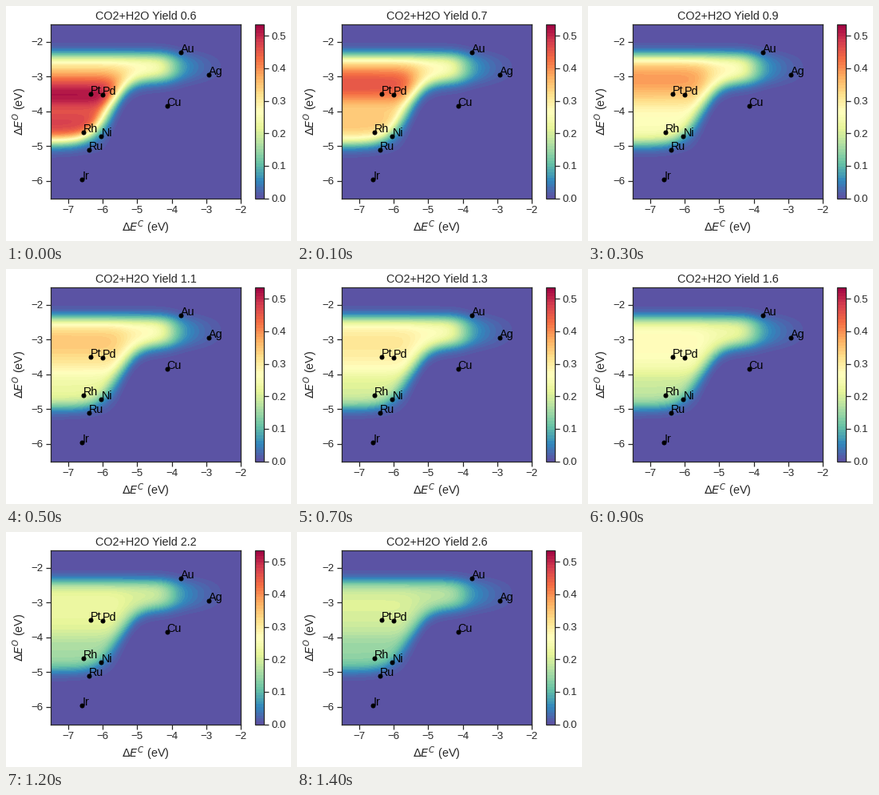
Animation, 357 px wide and 294 px high, one loop 1.5 s. Source, as a matplotlib script:

```python
import numpy as np
import matplotlib.pyplot as plt
from matplotlib.animation import FuncAnimation

W, H, DPI = 357, 294, 72
FRAMES, INTERVAL = 15, 100
INK = "0.15"
MAX_YIELD = 0.534

plt.rcParams.update({
    "font.family": "Liberation Sans",
    "font.size": 14.4,
    "axes.titlesize": 14.4,
    "axes.labelsize": 14.4,
    "axes.linewidth": 1.25,
    "axes.edgecolor": INK,
    "axes.labelcolor": INK,
    "text.color": INK,
})
for side in "xy":
    plt.rcParams.update({
        f"{side}tick.color": INK,
        f"{side}tick.labelsize": 13.2,
        f"{side}tick.major.size": 6,
        f"{side}tick.major.width": 1.25,
    })

METALS = {
    "Au": (-3.75, -2.29), "Ag": (-2.94, -2.94), "Cu": (-4.14, -3.85),
    "Pt": (-6.35, -3.49), "Pd": (-6.0, -3.51), "Rh": (-6.55, -4.61),
    "Ni": (-6.04, -4.71), "Ru": (-6.4, -5.1), "Ir": (-6.6, -5.95),
}

X, Y = np.meshgrid(np.linspace(-7.5, -2, 240), np.linspace(-6.5, -1.5, 220))
LEVELS = np.linspace(0, MAX_YIELD, 61)


def sigmoid(v):
    return 0.5 * (1 + np.tanh(v / 2))


def gauss(v):
    return np.exp(-0.5 * v ** 2)


def ratio(i):
    """Feed ratio, spaced evenly on a log scale."""
    return 0.642 * (2.645 / 0.642) ** (i / (FRAMES - 1))


def plateau(r, surplus):
    """Yield inside the active region: ridge, main peak and lower lobe."""
    peak = 0.357 * r ** -0.56 + 0.06 * surplus
    ridge = min(0.29, 0.9 * peak)
    lower = 0.235 * r ** -0.5 + 0.195 * surplus
    bump = gauss((Y + 3.03 + 0.5 * surplus) / 0.45) * sigmoid((-5.3 - X) / 0.2)
    upper = ridge + (peak - ridge) * bump
    return lower + (upper - lower) * sigmoid((Y + 3.95) / 0.13)


def below_edge(surplus):
    """Soft cut along the S-shaped lower boundary."""
    step = sigmoid((X + 5.57 + 0.28 * surplus) / 0.27)
    edge = -4.91 + 0.07 * surplus + 1.8 * step
    slope = 1.8 * step * (1 - step) / 0.27
    return sigmoid((Y - edge) / np.hypot(1, slope) / 0.12)


def field(i):
    surplus = np.exp(-i)  # early excess that dies out quickly
    top = sigmoid((-2.42 - Y) / 0.11)
    right = sigmoid((-4.02 - X) / 0.21)
    tail = 0.04 * gauss((X + 3.6) / 0.6)
    z = (plateau(ratio(i), surplus) * right + tail) * top * below_edge(surplus)
    return np.clip(z, 0, MAX_YIELD - 1e-4)


def box(x, y, w, h):
    return [x / W, 1 - (y + h) / H, w / W, h / H]


fig = plt.figure(figsize=(W / DPI, H / DPI), dpi=DPI, facecolor="white")
ax = fig.add_axes(box(56.2, 23.2, 238.1, 217.5))
cax = fig.add_axes(box(312, 23.2, 11, 217.5))


def draw_field(i):
    return ax.contourf(X, Y, field(i), levels=LEVELS, cmap="Spectral_r",
                       vmin=0, vmax=MAX_YIELD)


state = {"contours": draw_field(0)}
fig.colorbar(state["contours"], cax=cax, ticks=np.arange(6) / 10, format="%.1f")

for name, (x, y) in METALS.items():
    ax.plot(x, y, "o", color="black", ms=5, mew=1, zorder=3)
    ax.annotate(name, (x, y), color="black", zorder=4)

ax.set(xlim=(-7.5, -2), ylim=(-6.5, -1.5),
       xticks=range(-7, -1), yticks=range(-6, -1),
       xlabel=r"$\Delta E^C$ (eV)", ylabel=r"$\Delta E^O$ (eV)")
title = ax.set_title("")


def update(i):
    state["contours"].remove()
    state["contours"] = draw_field(i)
    title.set_text(f"CO2+H2O Yield {ratio(i):.1f}")
    return []


anim = FuncAnimation(fig, update, frames=FRAMES, interval=INTERVAL,
                     repeat=True, repeat_delay=0, blit=False)
plt.show()
```
